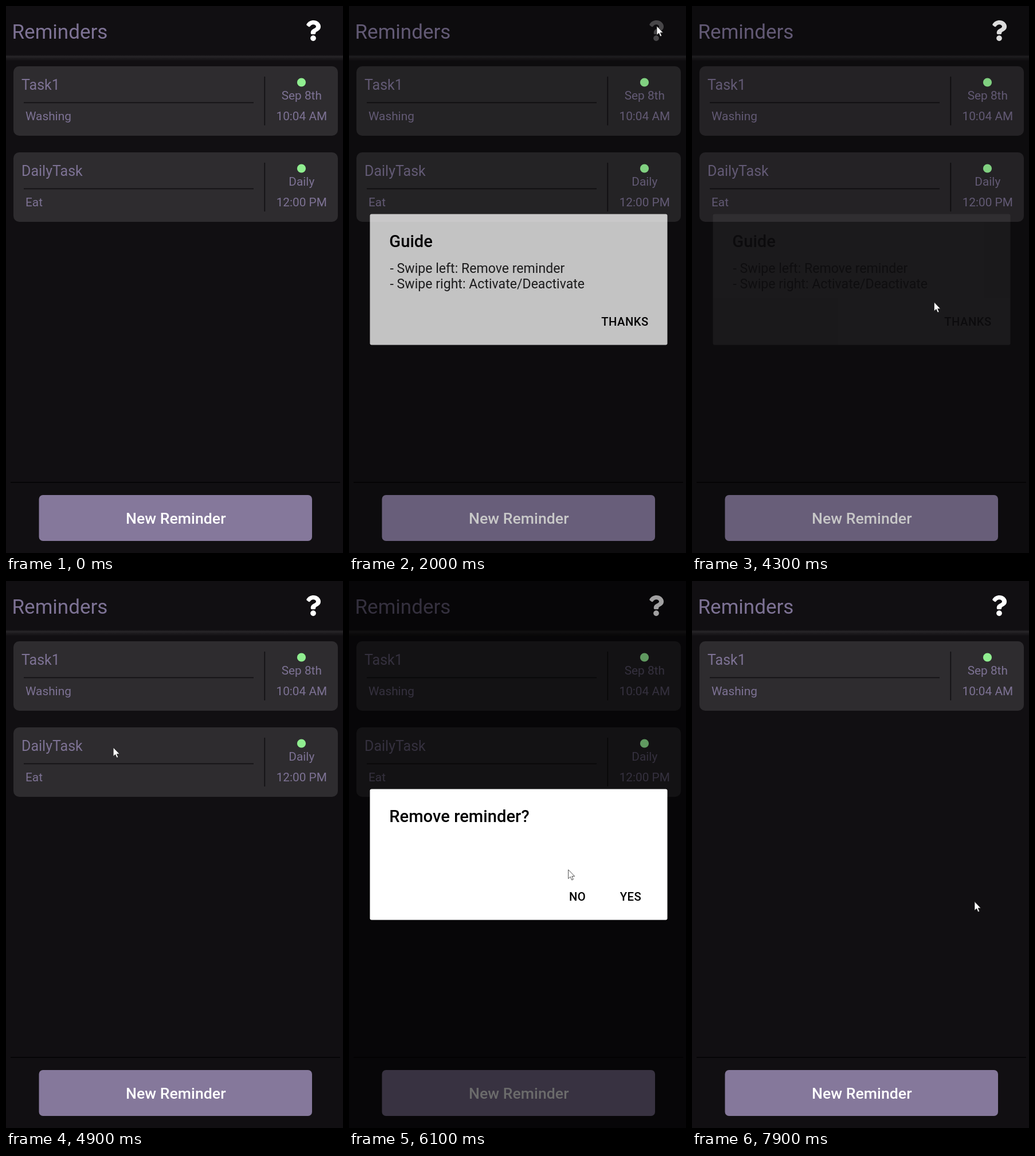
These frames come from a looping animation (588x953 px, 8000 ms). An HTML page:

```html
<!DOCTYPE html>
<html lang="en">
<head>
<meta charset="utf-8">
<title>Reminders</title>
<style>
  html, body { margin: 0; width: 100%; height: 100%; overflow: hidden; background: #110f12; }
  svg { display: block; width: 100%; height: 100%; font-family: Roboto, sans-serif; }
  .muted { fill: #7d7294; }
  .small { font-size: 20.8px; }
  .medium { font-weight: 500; }
  .mid { text-anchor: middle; }
  .title { font-size: 29.2px; font-weight: 500; }
  .body { font-size: 23.1px; fill: #222; }
  .action { font-size: 20.3px; font-weight: 500; letter-spacing: .4px; text-anchor: middle; }
</style>
</head>
<body>
<svg viewBox="0 0 588 953">
  <defs>
    <linearGradient id="edge" x2="0" y2="1">
      <stop offset="0" stop-color="#110f12"/>
      <stop offset=".3" stop-color="#29272a"/>
      <stop offset=".5" stop-color="#1e1c1f"/>
      <stop offset="1" stop-color="#110f12"/>
    </linearGradient>
  </defs>
  <rect width="588" height="953" fill="#110f12"/>
  <text class="muted" x="10.5" y="56.5" font-size="35">Reminders</text>
  <rect y="85" width="588" height="11" fill="url(#edge)"/>
  <g id="cards"></g>
  <path d="M8 830H583" stroke="#060507" stroke-width="2"/>
  <rect x="57.5" y="852" width="476.5" height="80" rx="7" fill="#85789b"/>
  <text class="medium mid" x="296.3" y="902" font-size="26.7" fill="#fff">New Reminder</text>

  <rect id="dim" width="588" height="953"/>
  <g id="dots" fill="#90ee90"></g>
  <path id="help" fill="#fff" transform="translate(522.5 25) scale(.0703)"
    d="M202 0C122 0 70 33 30 91C23 102 25 116 35 124L78 157C89 164 103 163 111 152C137 121 155 103 194 103C225 103 263 123 263 153C263 175 244 187 214 204C179 224 132 248 132 310V320Q132 344 156 344H228Q252 344 252 320V314C252 271 378 270 378 154C378 66 287 0 202 0Z
       M192 373a69.3 69.3 0 1 0 .1 0Z"/>

  <g id="guide">
    <rect x="36.5" y="362.5" width="519" height="228" rx="3" fill="#fff"/>
    <text class="title" x="70.3" y="419.5">Guide</text>
    <text class="body" x="71.5" y="464.5">- Swipe left: Remove reminder</text>
    <text class="body" x="71.5" y="491.5">- Swipe right: Activate/Deactivate</text>
    <text class="action" x="481.5" y="557.4">THANKS</text>
  </g>
  <g id="confirm">
    <rect x="36.5" y="362.5" width="519" height="228" rx="3" fill="#fff"/>
    <text class="title" x="70.3" y="419.5">Remove reminder?</text>
    <text class="action" x="398.5" y="557.4">NO</text>
    <text class="action" x="491.5" y="557.4">YES</text>
  </g>
  <path id="cursor" d="M0 0V15.6L3.6 12.3L6.1 18L8.6 16.9L6.2 11.4H11Z"
    fill="#fff" stroke="#222" stroke-width=".8"/>
</svg>
<script>
const LOOP = 8000, FADE = 220, REMOVED = 7780;
const $ = id => document.getElementById(id);
const clamp = v => Math.max(0, Math.min(1, v));
const lerp = (a, b, u) => a + (b - a) * u;
const show = (el, on) => el.setAttribute('visibility', on ? 'visible' : 'hidden');

const tasks = [
  ['Task1', 'Washing', 'Sep 8th', '10:04 AM'],
  ['DailyTask', 'Eat', 'Daily', '12:00 PM']
];
tasks.forEach(([name, note, day, time], i) => {
  const y = 150 * i;
  $('cards').innerHTML += `<g transform="translate(0 ${y})">
    <rect x="13" y="105" width="566" height="121" rx="10" fill="#2e2c2f"/>
    <path d="M31 168.3H432M451.3 123V208" stroke="#131114" stroke-width="1.8"/>
    <g class="muted">
      <text x="27" y="146" font-size="25">${name}</text>
      <text class="small" x="34" y="199">${note}</text>
      <text class="small mid" x="515.8" y="162.8">${day}</text>
      <text class="small mid" x="515.8" y="199.4">${time}</text>
    </g></g>`;
  $('dots').innerHTML += `<circle cx="515.5" cy="${133 + y}" r="7.6"/>`;
});

const dialogs = [
  { el: $('guide'), open: 1919, close: 4164 },
  { el: $('confirm'), open: 4940, close: 7680 }
];

// time, x, y of the pointer tip
const path = [
  [1900, 537, 35], [3200, 537, 35], [3400, 536, 72], [3850, 470, 545],
  [4170, 470, 545], [4300, 422.5, 516], [4650, 370, 290], [4750, 370, 290],
  [4930, 173.5, 290], [5500, 173.5, 290], [6300, 421, 542], [6600, 420, 546],
  [6750, 420, 546], [7200, 493, 558.5], [LOOP, 493, 558.5]
];

function pointer(t) {
  const i = path.findIndex(k => k[0] > t);
  const [t0, x0, y0] = path[i - 1], [t1, x1, y1] = path[i];
  const u = (t - t0) / (t1 - t0), s = u * u * (3 - 2 * u);
  return [lerp(x0, x1, s), lerp(y0, y1, s)];
}

function draw(t) {
  let dim = 0;
  for (const { el, open, close } of dialogs) {
    const up = clamp((t - open) / FADE), down = clamp((t - close) / FADE);
    el.setAttribute('opacity', (1 - (1 - up) ** 3) * (1 - down) ** 3);
    dim += up - down;
  }
  $('dim').setAttribute('opacity', .58 * dim);

  // the help icon fades while held down
  const press = clamp((t - 1850) / 120) - clamp((t - 2060) / 200);
  const glow = 1 - .38 * dim;
  $('dots').setAttribute('opacity', glow);
  $('help').setAttribute('opacity', glow * (1 - .72 * press));

  show($('cards').children[1], t < REMOVED);
  show($('dots').children[1], t < REMOVED);

  const active = t >= path[0][0];
  show($('cursor'), active);
  if (active) $('cursor').setAttribute('transform', `translate(${pointer(t)})`);
}

const start = performance.now();
function tick() {
  draw((performance.now() - start) % LOOP);
  requestAnimationFrame(tick);
}
tick();
</script>
</body>
</html>
```
